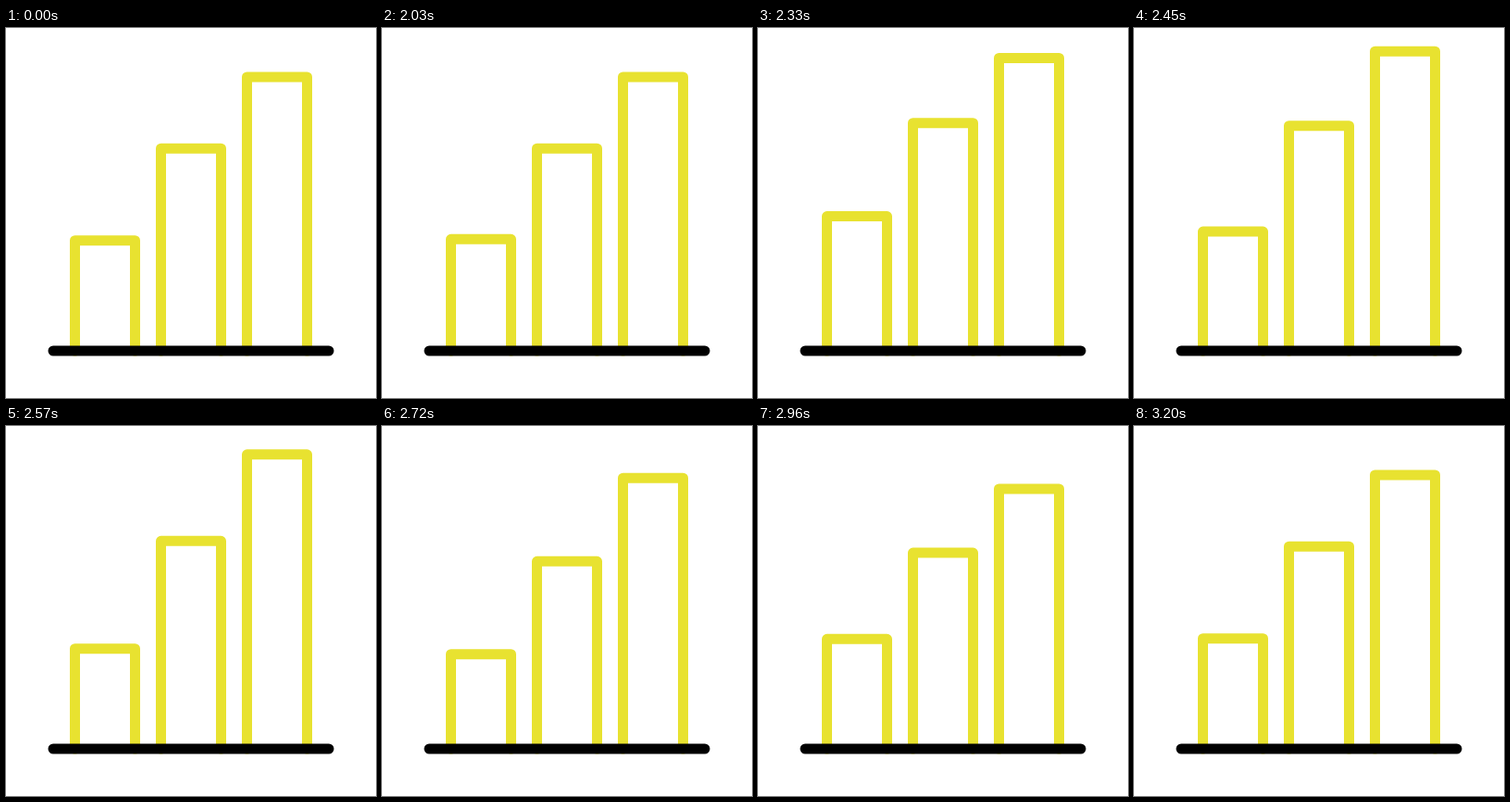
Animation, 400 px wide and 400 px high, one loop 3230 ms. Source, as an HTML page:

```html
<!DOCTYPE html>
<html lang="en">
<head>
<meta charset="utf-8">
<title>Bouncing bar chart</title>
<style>
  html, body { margin: 0; width: 100%; height: 100%; overflow: hidden; background: #fff; }
  svg { display: block; width: 100%; height: 100%; }
  path { fill: none; stroke-width: 11; stroke-linecap: round; stroke-linejoin: round; }
  .bar { stroke: #e8e230; }
  .base { stroke: #000; }
</style>
</head>
<body>
<svg viewBox="0 0 400 400">
  <path class="bar"/>
  <path class="bar"/>
  <path class="bar"/>
  <path class="base" d="M51 349H349"/>
</svg>
<script>
const LOOP = 3230, START = 2000, STEP = 30, LAG = 100;
const bars = [[74.5, 229.7], [167.5, 130.2], [260.5, 53]];
const paths = document.querySelectorAll('.bar');

const easeOut = u => 1 - (1 - u) ** 2.5;
const easeInOut = u => (1 - Math.cos(Math.PI * u)) / 2;

// [start, end, from, to, easing]: stretch up, squash down, settle
const moves = [
  [25, 280, 0, -28, easeOut],
  [280, 670, -28, 18, easeInOut],
  [670, 1000, 18, 0, easeInOut]
];

function offset(t) {
  const move = moves.find(([start, end]) => t >= start && t < end);
  if (!move) return 0;
  const [start, end, from, to, ease] = move;
  return from + (to - from) * ease((t - start) / (end - start));
}

function draw(now) {
  const time = now % LOOP - START;
  const t = Math.floor(time / STEP) * STEP;
  bars.forEach(([x, top], i) => {
    const y = top + offset(t - i * LAG);
    paths[i].setAttribute('d', `M${x} 349V${y}h65V349`);
  });
  requestAnimationFrame(draw);
}
draw(performance.now());
</script>
</body>
</html>
```
